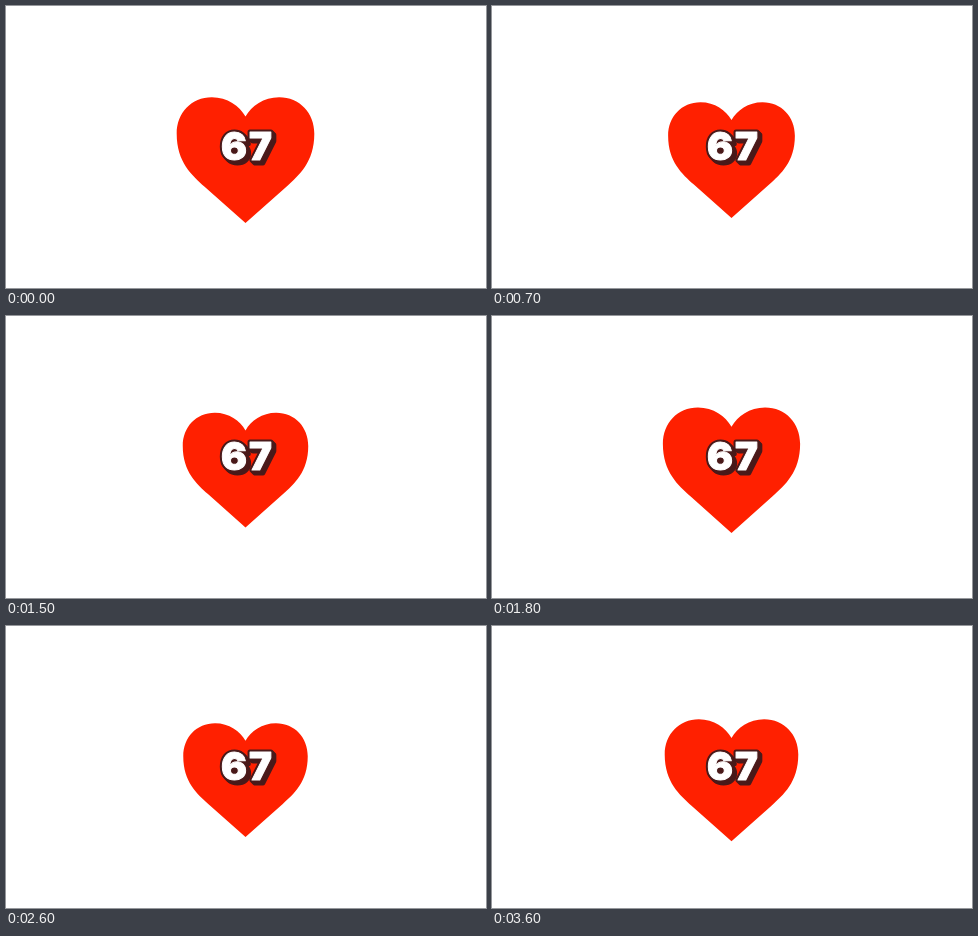
Animation of 480x282 px, one loop 3.7 s. Source, as an HTML page:

```html
<!DOCTYPE html>
<html lang="en">
<head>
<meta charset="utf-8">
<title>Beating heart</title>
<style>
  html, body { margin: 0; width: 100%; height: 100%; overflow: hidden; background: #fff; }
  svg { display: block; width: 100vw; height: 100vh; }
  text { font: 900 38.5px Inter, "Open Sans", sans-serif; letter-spacing: 2px; text-anchor: middle; stroke-linejoin: round; }
  .edge { fill: #4a1a1a; stroke: #4a1a1a; stroke-width: 5; }
  .face { fill: #fff; stroke: #fff; stroke-width: 1; }
</style>
</head>
<body>
<svg viewBox="0 0 480 282">
  <path id="heart" fill="#ff2000" d="M0-43.5 C-6-54-18-62.7-33.5-62.7 C-54-62.7-68.5-47-68.5-26.5
    C-68.5 2-53 15-41 26 L0 62.5 L41 26 C53 15 68.5 2 68.5-26.5 C68.5-47 54-62.7 33.5-62.7 C18-62.7 6-54 0-43.5Z"/>
  <g id="label"></g>
</svg>
<script>
const LOOP = 3700, STEP = 100;
const BASE_WIDTH = 137, MEAN_WIDTH = 127, SWING = 14.5;

// Beat phase in degrees at a few times in ms; 0 is fully swollen.
const PHASE = [[0, -43], [700, 91], [1500, 264], [1800, 315], [2200, 390],
               [2600, 460], [3200, 577], [3700, 677]];

const heart = document.getElementById("heart");
const label = document.getElementById("label");

function addText(offset, className) {
  const el = document.createElementNS("http://www.w3.org/2000/svg", "text");
  el.textContent = "67";
  el.setAttribute("x", 241.5 + offset);
  el.setAttribute("y", 154 + offset);
  el.setAttribute("class", className);
  label.append(el);
}

for (let offset = 3; offset >= 0; offset--) addText(offset, "edge");
addText(0, "face");

function phaseAt(t) {
  const i = PHASE.findIndex(([time]) => time > t);
  const [t0, p0] = PHASE[i - 1], [t1, p1] = PHASE[i];
  return p0 + (p1 - p0) * (t - t0) / (t1 - t0);
}

function draw(ms) {
  const t = Math.floor((ms % LOOP) / STEP) * STEP;
  const width = MEAN_WIDTH + SWING * Math.cos(phaseAt(t) * Math.PI / 180);
  heart.setAttribute("transform", `translate(239.5 154.3) scale(${width / BASE_WIDTH})`);
}

const start = performance.now();
function tick() {
  draw(performance.now() - start);
  requestAnimationFrame(tick);
}
tick();
</script>
</body>
</html>
```
